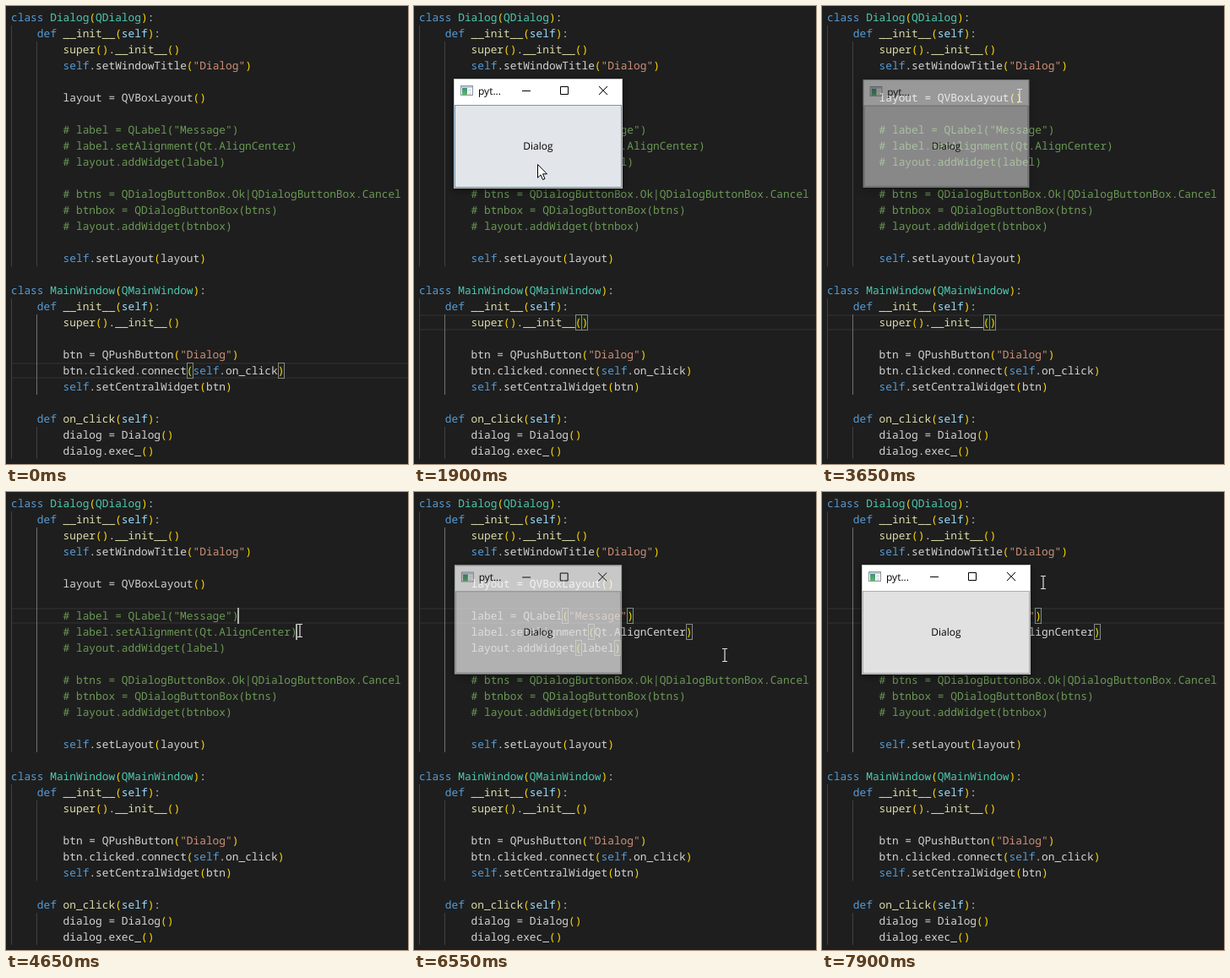
Write an HTML page that moves like this. It is 476 by 542 pixels and loops after 8 s.

```html
<!DOCTYPE html>
<html lang="en">
<head>
<meta charset="utf-8">
<title>Dialog demo</title>
<style>
  html, body { margin: 0; width: 100%; height: 100%; overflow: hidden; background: #1e1e1e; }
  svg { display: block; }
  text { text-rendering: geometricPrecision; white-space: pre; }
  .code text { font: 12.83px "Noto Sans Mono", "DejaVu Sans Mono", monospace; fill: #d4d4d4; }
  .win text { font: 12px "Open Sans", "Noto Sans", sans-serif; fill: #000; }
</style>
</head>
<body>
<svg id="stage" width="476" height="542" viewBox="0 0 476 542">
  <defs>
    <filter id="shadow" x="-30%" y="-40%" width="160%" height="190%">
      <feDropShadow dx="0" dy="2" stdDeviation="5" flood-color="#000" flood-opacity=".5"/>
    </filter>
    <linearGradient id="pane" x2="0" y2="1">
      <stop offset="0" stop-color="#3f8f8a"/><stop offset="1" stop-color="#5cb860"/>
    </linearGradient>
  </defs>
</svg>
<script>
const LOOP = 8000, CW = 7.698, ROW = 19, X0 = 6, Y0 = 4;
const stage = document.getElementById('stage');
const colX = c => X0 + c * CW, rowY = r => Y0 + r * ROW;

function add(parent, tag, attrs = {}, text) {
  const el = document.createElementNS('http://www.w3.org/2000/svg', tag);
  for (const k in attrs) el.setAttribute(k, attrs[k]);
  if (text !== undefined) el.textContent = text;
  return parent.appendChild(el);
}
const rect = (p, x, y, width, height, fill, more) =>
  add(p, 'rect', { x, y, width, height, fill, ...more });
const show = (el, on) => el.setAttribute('visibility', on ? 'visible' : 'hidden');
const fade = (el, o) => el.setAttribute('opacity', o);

// ---- editor ----
const source = `class Dialog(QDialog):
    def __init__(self):
        super().__init__()
        self.setWindowTitle("Dialog")

        layout = QVBoxLayout()

        # label = QLabel("Message")
        # label.setAlignment(Qt.AlignCenter)
        # layout.addWidget(label)

        # btns = QDialogButtonBox.Ok|QDialogButtonBox.Cancel
        # btnbox = QDialogButtonBox(btns)
        # layout.addWidget(btnbox)

        self.setLayout(layout)

class MainWindow(QMainWindow):
    def __init__(self):
        super().__init__()

        btn = QPushButton("Dialog")
        btn.clicked.connect(self.on_click)
        self.setCentralWidget(btn)

    def on_click(self):
        dialog = Dialog()
        dialog.exec_()`.split('\n');

function tint(tok, line) {
  if (tok[0] === '#') return '#6a9955';
  if (tok[0] === '"') return '#ce9178';
  if (/[()]/.test(tok)) return '#ffd700';
  if (!/^\w/.test(tok)) return '#d4d4d4';
  if (tok === 'class' || tok === 'def') return '#569cd6';
  if (tok === 'self') return line.startsWith('def') ? '#9cdcfe' : '#569cd6';
  if (line.startsWith('class')) return '#4ec9b0';
  if (line.startsWith('def') || tok === 'super' || tok === '__init__') return '#dcdcaa';
  return '#d4d4d4';
}

function codeLine(parent, str, row) {
  const line = str.trim();
  const el = add(parent, 'text', { x: colX(str.length - line.length), y: rowY(row) + 14 });
  for (const tok of line.match(/#.*|"[^"]*"|\w+|[()]|[^\w()"#]+/g) || [])
    add(el, 'tspan', { fill: tint(tok, line) }, tok);
}

const code = add(stage, 'g', { class: 'code' });
const lineBox = add(code, 'g');
for (const y of [0, 17]) rect(lineBox, X0, y, 470, 2, '#282828');

const guide = (col, from, to, fill = '#404040') =>
  rect(code, Math.floor(colX(col)), rowY(from), 1, (to - from) * ROW, fill);
guide(0, 1, 16); guide(0, 18, 28);
guide(4, 2, 16); guide(4, 19, 24); guide(4, 26, 28);
const scopes = { dialog: guide(4, 2, 16, '#707070'), main: guide(4, 19, 24, '#707070') };

const marks = add(code, 'g');
const before = add(code, 'g'), after = add(code, 'g');
source.forEach((s, r) => {
  const toggled = r >= 7 && r <= 9;
  codeLine(toggled ? before : code, s, r);
  if (toggled) codeLine(after, s.replace('# ', ''), r);
});
const carets = add(code, 'g');

const first = [[7, 35]], two = [...first, [8, 44]], three = [...two, [9, 33]];
const ends = [[7, 33], [8, 42], [9, 31]];
const pairs = [[7, 22], [7, 32], [8, 26], [8, 41], [9, 24], [9, 30]];
const superEnd = [[19, 26]], superPair = [[19, 24], [19, 25]];

// time, current row, carets, matched brackets, uncommented
const edits = [
  [0, 22, [], [[22, 27], [22, 41]]],
  [300, 19, superEnd, superPair],
  [600, 19, [], superPair],
  [950, 19, superEnd, superPair],
  [1250, 19, [], superPair],
  [1550, 19, superEnd, superPair],
  [1600, 19, [], superPair],
  [4300, 7, first, []],
  [4600, 7, two, []],
  [4950, 7, three, []],
  [5250, 7, [], []],
  [5500, 7, ends, [], true],
  [5750, 7, ends, pairs, true],
  [5800, 7, [], pairs, true],
  [6150, 7, ends, pairs, true],
  [6450, 7, [], pairs, true]
];

let shown = null;
function drawEdit(t) {
  const now = edits.findLast(e => e[0] <= t);
  if (now === shown) return;
  shown = now;
  const [, row, tips, match, open] = now;
  lineBox.setAttribute('transform', `translate(0 ${rowY(row)})`);
  show(scopes.dialog, row < 16);
  show(scopes.main, row > 16);
  show(before, !open);
  show(after, !!open);
  marks.replaceChildren();
  for (const [r, c] of match)
    rect(marks, Math.round(colX(c)) + .5, rowY(r) + .5, 7, 18, '#1b251b', { stroke: '#888' });
  carets.replaceChildren();
  for (const [r, c] of tips) rect(carets, Math.floor(colX(c)) - 1, rowY(r), 2, ROW, '#aeafad');
}

// ---- windows ----
function appIcon(p, x, y) {
  rect(p, x + .5, y + .5, 14, 11, '#fff', { stroke: '#8b979f' });
  rect(p, x + 1, y + 1, 13, 2, '#c3ccd2');
  rect(p, x + 2, y + 3, 6, 8, 'url(#pane)');
  rect(p, x + 9, y + 4, 4, 3, '#dfe5e8');
  rect(p, x + 9, y + 8, 4, 3, '#dfe5e8');
}
const cross = (p, x, y) =>
  add(p, 'path', { d: `M${x - 5} ${y - 5}l10 10m0 -10l-10 10`, stroke: '#000', fill: 'none' });

function frame(x, y, w, h, bar) {
  const g = add(stage, 'g', { class: 'win' });
  rect(g, x, y, w, h, '#f0f0f0', { filter: 'url(#shadow)' });
  rect(g, x, y, w, bar, '#fff');
  appIcon(g, x + 8, y + 8);
  return { g, x, y, w, h, cx: x + w / 2, cy: y + h / 2 };
}

const main = frame(47, 86, 200, 130, 31);
main.title = add(main.g, 'text', { x: 76, y: 105 }, 'pyt...');
main.hot = rect(main.g, 202, 87, 44, 29, '#e81123');
main.ctl = add(main.g, 'g');
add(main.ctl, 'path', { d: 'M128 100.5h10M173.5 95.5h9v9h-9z', stroke: '#000', fill: 'none' });
main.x1 = cross(main.ctl, 224, 100);
rect(main.g, 48.5, 117.5, 197, 97, '#e1e1e1', { stroke: '#adadad' });
main.hover = rect(main.g, 48.5, 117.5, 197, 97, '#e5f1fb', { stroke: '#0078d7' });
add(main.g, 'text', { x: 147, y: 170, 'text-anchor': 'middle' }, 'Dialog');
rect(main.g, 47.5, 86.5, 199, 129, 'none', { stroke: '#9aa0a4', 'stroke-opacity': .6 });

function popup(x, y, h, label) {
  const d = frame(x, y, 98, h, 29);
  add(d.g, 'text', { x: x + 27, y: y + 18, style: 'font-size:13px;font-weight:600' }, '?');
  d.hot = rect(d.g, x + 53, y, 45, 29, '#e81123');
  d.x1 = cross(d.g, x + 75, y + 14);
  if (label) add(d.g, 'text', { x: x + 11, y: y + 51 }, label);
  return d;
}
const plain = popup(356, 315, 52);
const message = popup(330, 309, 64, 'Message');

const ramp = (t, a, b) => Math.min(1, Math.max(0, (t - a) / (b - a)));
// opening start, closing start
const life = (t, open, close) => {
  const o = ramp(t, open, open + 200), c = ramp(t, close, close + 200);
  return (1 - (1 - o) * (1 - o)) * (1 - c);
};

function pose(w, o) {
  const s = .96 + .04 * o;
  show(w.g, o > .01);
  fade(w.g, o);
  w.g.setAttribute('transform',
    `translate(${w.cx} ${w.cy}) scale(${s}) translate(${-w.cx} ${-w.cy})`);
}

function drawClose(w, over, pressed, idle) {
  fade(w.hot, over ? 1 : 0);
  w.hot.setAttribute('fill', pressed ? '#f1707a' : '#e81123');
  w.x1.setAttribute('stroke', over ? (pressed ? '#f9b7bc' : '#fff') : idle);
}

// ---- pointer ----
const arrow = add(stage, 'path', {
  d: 'M.5 .5V16.2L4 12.8L6.5 18.5L9 17.4L6.5 11.8H11.5Z', fill: '#fff', stroke: '#000'
});
const beam = add(stage, 'path', {
  d: 'M-3 -7.5h2.5l.5 .5l.5 -.5h2.5M-3 7.5h2.5l.5 -.5l.5 .5h2.5M0 -7v14',
  fill: 'none', stroke: '#e1e1e1', 'stroke-width': 1.2
});

const path = [
  [50, 390, 513], [300, 300, 366], [1600, 300, 366], [1850, 146, 187], [2200, 146, 187],
  [2350, 178, 150], [2600, 234, 102], [2750, 234, 102], [2950, 430, 331], [3050, 430, 331],
  [3350, 230, 100], [3550, 230, 100], [3650, 234, 106], [3850, 234, 106], [4300, 316, 146],
  [4400, 316, 146], [4550, 352, 160], [4650, 348, 164], [4720, 348, 164], [4950, 272, 185],
  [6450, 272, 185], [6550, 368, 193], [6620, 368, 193], [6850, 160, 180], [7250, 160, 180],
  [7500, 415, 323], [7650, 415, 323], [7900, 262, 107], [LOOP, 262, 107]
];
function pointer(t) {
  const i = path.findLastIndex(k => k[0] <= t);
  if (i < 0) return null;
  const [a, b] = [path[i], path[Math.min(i + 1, path.length - 1)]];
  const p = ramp(t, a[0], b[0] || 1), e = p * p * (3 - 2 * p);
  return [a[1] + (b[1] - a[1]) * e, a[2] + (b[2] - a[2]) * e];
}
const inside = (w, [x, y]) => x >= w.x && x < w.x + w.w && y >= w.y && y < w.y + w.h;

function draw(t) {
  drawEdit(t);
  const late = t >= 4000;
  const oMain = late ? life(t, 6450, 1e6) : life(t, 1600, 3560);
  const oPlain = life(t, 2050, 3050), oMsg = life(t, 7050, 7600);
  pose(main, oMain);
  pose(plain, oPlain);
  pose(message, oMsg);

  const blocked = (t >= 2050 && t < 3050) || (t >= 7050 && t < 7600);
  const closing = t >= 3560 && t < 4000;
  const ink = blocked ? '#999' : '#000';
  main.title.style.fill = ink;
  main.ctl.firstChild.setAttribute('stroke', ink);
  show(main.ctl, !closing && oMain > .01);

  const at = pointer(t), pos = at || [-50, -50];
  const overX = (w, bw) => inside({ x: w.x + w.w - bw, y: w.y, w: bw, h: 29 }, pos);
  drawClose(main, overX(main, 45) && !blocked && !closing, t > 3500, ink);
  drawClose(plain, overX(plain, 45), t >= 2990, '#000');
  drawClose(message, overX(message, 45), t >= 7540, '#000');

  const glow = late ? ramp(t, 6800, 7050) : ramp(t, 1820, 2050);
  fade(main.hover, blocked || t >= 7600 || (!late && t >= 3050) ? 0 : glow);

  const onWin = (oMain > .3 && !closing && inside(main, pos)) ||
    (oPlain > .3 && inside(plain, pos)) || (oMsg > .3 && inside(message, pos));
  show(arrow, at && onWin);
  show(beam, at && !onWin);
  const move = `translate(${Math.round(pos[0])} ${Math.round(pos[1])})`;
  arrow.setAttribute('transform', move);
  beam.setAttribute('transform', move);
}

const start = performance.now();
function tick() {
  draw((performance.now() - start) % LOOP);
  requestAnimationFrame(tick);
}
tick();
</script>
</body>
</html>
```
